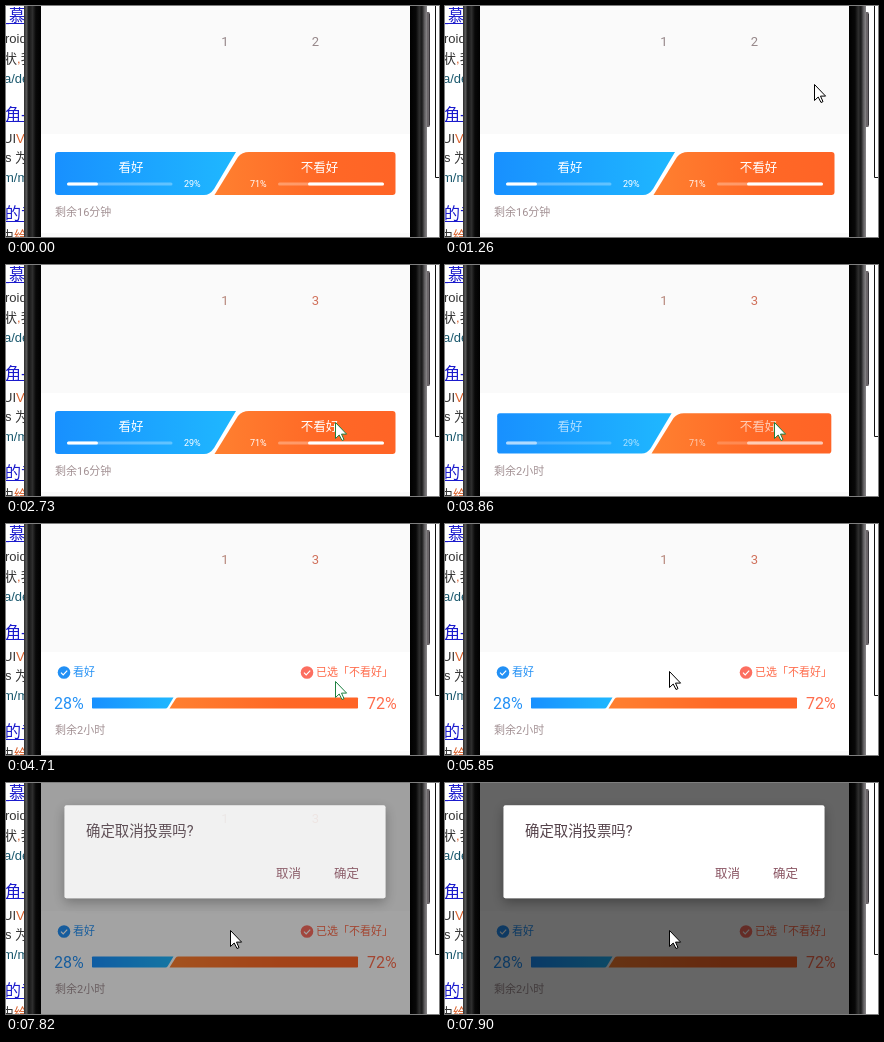
Write an HTML page that moves like this. It is 433x231 px and loops after 8 s.

```html
<!DOCTYPE html>
<html lang="zh">
<head>
<meta charset="utf-8">
<title>Vote</title>
<style>
  html, body { margin: 0; width: 100%; height: 100%; overflow: hidden; background: #fff; }
  svg { display: block; width: 433px; height: 231px; }
  text { font-family: Roboto, "Noto Sans CJK SC", "Noto Sans CJK", sans-serif; white-space: pre; }
  .web text { font-family: "Liberation Sans", "Noto Sans CJK SC", "Noto Sans CJK", sans-serif; font-size: 13px; fill: #333; }
  .web .link { font-size: 16px; fill: #1a1acc; }
  .web .url { fill: #17566b; }
  .web .hit { fill: #d9602b; }
  .mid { text-anchor: middle; }
  .num { font-size: 13px; }
  .name { font-size: 12.5px; fill: #fff; }
  .small { font-size: 9px; fill: #fff; }
  .label { font-size: 11px; }
  .big { font-size: 16px; }
  .blue { fill: #2290f5; }
  .red { fill: #ff6c4c; }
</style>
</head>
<body>
<svg viewBox="0 0 433 231">
  <defs>
    <linearGradient id="blue"><stop stop-color="#1890ff"/><stop offset="1" stop-color="#1fb8ff"/></linearGradient>
    <linearGradient id="orange"><stop stop-color="#ff8030"/><stop offset=".6" stop-color="#ff6826"/><stop offset="1" stop-color="#ff6426"/></linearGradient>
    <linearGradient id="bezelLeft">
      <stop stop-color="#2b2b2b"/><stop offset=".14" stop-color="#5a5a5a"/><stop offset=".28" stop-color="#161616"/>
      <stop offset=".5" stop-color="#2e2e2e"/><stop offset=".7" stop-color="#080808"/><stop offset="1" stop-color="#000"/>
    </linearGradient>
    <linearGradient id="bezelRight">
      <stop stop-color="#000"/><stop offset=".35" stop-color="#080808"/><stop offset=".55" stop-color="#2e2e2e"/>
      <stop offset=".7" stop-color="#1a1a1a"/><stop offset=".85" stop-color="#5e5c5e"/><stop offset="1" stop-color="#8a888a"/>
    </linearGradient>
    <filter id="shadow" x="-10%" y="-20%" width="120%" height="150%">
      <feDropShadow dx="0" dy="4" stdDeviation="6" flood-opacity=".32"/>
    </filter>
    <clipPath id="screen"><rect x="35" width="369" height="231"/></clipPath>
  </defs>

  <rect width="433" height="231" fill="#fff"/>
  <g class="web">
    <text class="link" x="-6" y="15">_慕</text>
    <text x="-1" y="37">roid</text>
    <text x="-2" y="57">状<tspan class="hit">,</tspan>我</text>
    <text class="url" x="-2" y="77">a/de</text>
    <text class="link" x="-1" y="114">角-</text>
    <text x="-3" y="137">UI<tspan class="hit">Vi</tspan></text>
    <text x="-1" y="156">s 为</text>
    <text class="url" x="-3" y="176">m/m</text>
    <text class="link" x="-1" y="213">的专</text>
    <text x="-5" y="234">由<tspan class="hit">给</tspan></text>
    <path d="M0 17.5H19M0 115.5H19M0 215.5H19" stroke="#1a1acc"/>
  </g>
  <path d="M429.5 0V171.5H433" fill="none" stroke="#111"/>
  <rect x="419" y="6" width="5" height="115" rx="1.5" fill="#6b6669"/>
  <path d="M423.5 8V119" stroke="#39363a"/>
  <rect x="18" width="17" height="231" fill="url(#bezelLeft)"/>
  <rect x="404" width="17" height="231" fill="url(#bezelRight)"/>

  <g clip-path="url(#screen)">
    <rect x="35" width="369" height="231" fill="#fafafa"/>
    <rect x="35" y="128" width="369" height="99" fill="#fff"/>
    <g class="num mid">
      <text id="first" x="219" y="40">1</text>
      <text id="second" x="309.5" y="40">2</text>
    </g>
    <path id="left" fill="url(#blue)"/>
    <path id="right" fill="url(#orange)"/>
    <g id="before">
      <text class="name mid" x="125" y="166">看好</text>
      <text class="name mid" x="313.5" y="166">不看好</text>
      <text class="small" x="178" y="181">29%</text>
      <text class="small" x="244" y="181">71%</text>
      <g fill="#fff">
        <rect x="61" y="176.5" width="105.5" height="3" rx="1.5" opacity=".3"/>
        <rect x="61" y="176.5" width="31" height="3" rx="1.5"/>
        <rect x="272" y="176.5" width="106" height="3" rx="1.5" opacity=".3"/>
        <rect x="302" y="176.5" width="76" height="3" rx="1.5"/>
      </g>
    </g>
    <g id="after">
      <circle class="blue" cx="58" cy="148.5" r="6.3"/>
      <circle cx="301" cy="148.5" r="6.3" fill="#fc6e60"/>
      <path d="M55 148.6l2.2 2.2 4-4.2M298 148.6l2.2 2.2 4-4.2" fill="none" stroke="#fff" stroke-width="1.2"/>
      <text class="label blue" x="67" y="152.3">看好</text>
      <text class="label red" x="310" y="152.3">已选「不看好」</text>
      <text class="big blue" x="48" y="185">28%</text>
      <text class="big red" x="361" y="185">72%</text>
    </g>
    <text id="remain" class="label" x="49" y="210" fill="#a39194"></text>
    <rect id="dim" x="35" width="369" height="231"/>
    <g id="dialog">
      <rect x="58.5" y="22.3" width="321" height="93" rx="2" fill="#fff" filter="url(#shadow)"/>
      <text x="80" y="53" font-size="14.4" fill="#54424a">确定取消投票吗?</text>
      <g font-size="12.5" fill="#8a5563">
        <text x="270" y="94.5">取消</text>
        <text x="328" y="94.5">确定</text>
      </g>
    </g>
  </g>

  <circle id="press" r="12" fill="#ff0" fill-opacity=".47"/>
  <path id="cursor" d="M.5.5V16.5L4.2 13 7 18.5 9 17.6 6.5 12.1H11.6Z" fill="#fff"/>
</svg>
<script>
const LOOP = 8000;
const $ = id => document.getElementById(id);
const el = Object.fromEntries(
  ['first', 'second', 'left', 'right', 'before', 'after', 'remain', 'dim', 'dialog', 'press', 'cursor']
    .map(id => [id, $(id)]));

// time, x, y of the pointer tip
const pointer = [
  [90, 431, 184], [160, 429, 150], [230, 426, 108], [300, 423, 76], [360, 420, 58], [420, 419, 53],
  [560, 419, 53], [600, 414, 53], [1010, 414, 53], [1260, 369, 78], [1500, 344, 124],
  [1680, 333, 148], [1810, 329, 157], [5590, 329, 157], [5650, 312, 159], [5750, 256, 153], [5850, 224, 147]
];
// time, dim, dialog opacity
const popup = [[0, 0, 0], [7770, .12, .35], [7820, .36, .86], [7850, .5, 1], [7900, .6, 1]];

const mix = (a, b, k) => a + (b - a) * k;
const clamp = v => Math.min(1, Math.max(0, v));
const ease = v => (1 - Math.cos(Math.PI * clamp(v))) / 2;
const between = (t, a, b) => t >= a && t < b;

function pointerAt(t) {
  const i = pointer.findIndex(p => p[0] > t);
  if (i < 0) return pointer[pointer.length - 1].slice(1);
  const [a, b] = [pointer[Math.max(0, i - 1)], pointer[i]];
  const k = clamp((t - a[0]) / (b[0] - a[0] || 1));
  return [1, 2].map(n => Math.round(mix(a[n], b[n], k)));
}

// Two facing halves with a slanted gap, scaled by their height
function drawHalves(x0, x1, y0, y1, tip) {
  const k = (y1 - y0) / 43, r = 3 * k, gap = 2 * (1 - k);
  const x = d => tip + d * k, y = d => y0 + d * k;
  el.left.setAttribute('d',
    `M${x0 + r} ${y0}H${tip}L${x(-22)} ${y(37)}Q${x(-26)} ${y1} ${x(-32)} ${y1}` +
    `H${x0 + r}Q${x0} ${y1} ${x0} ${y1 - r}V${y0 + r}Q${x0} ${y0} ${x0 + r} ${y0}Z`);
  el.right.setAttribute('d',
    `M${x(13) + gap} ${y0}H${x1 - r}Q${x1} ${y0} ${x1} ${y0 + r}V${y1 - r}Q${x1} ${y1} ${x1 - r} ${y1}` +
    `H${x(-21.5) + gap}L${x(2) + gap} ${y(5)}Q${x(6) + gap} ${y0} ${x(13) + gap} ${y0}Z`);
}

function render(t) {
  const voted = t >= 2730;
  el.second.textContent = voted ? 3 : 2;
  el.first.setAttribute('fill', voted ? '#b58478' : '#968789');
  el.second.setAttribute('fill', voted ? '#d0705a' : '#968789');

  const fold = ease((t - 3710) / 800), slide = ease((t - 3710) / 1000);
  drawHalves(mix(49, 86, fold), mix(389.5, 352, fold), mix(146, 173.6, fold), mix(189, 184.6, fold), mix(230, 167.5, slide));
  el.before.setAttribute('opacity', clamp(1 - fold * 4));
  el.after.setAttribute('opacity', clamp(fold * 2 - 1));
  el.remain.textContent = t < 3710 ? '剩余16分钟' : '剩余2小时';

  const [, dim, shown] = popup.filter(p => p[0] <= t).pop();
  el.dim.setAttribute('opacity', dim);
  el.dialog.setAttribute('opacity', shown);

  const [x, y] = pointerAt(t), place = `translate(${x} ${y})`;
  el.cursor.setAttribute('transform', place);
  el.cursor.setAttribute('visibility', t < 90 ? 'hidden' : 'visible');
  el.cursor.setAttribute('stroke', between(t, 2730, 5590) ? '#1c8040' : '#000');
  el.press.setAttribute('transform', place);
  el.press.setAttribute('visibility', between(t, 2090, 2680) || between(t, 6980, 7390) ? 'visible' : 'hidden');
}

const start = performance.now();
function tick() {
  render((performance.now() - start) % LOOP);
  requestAnimationFrame(tick);
}
tick();
</script>
</body>
</html>
```
